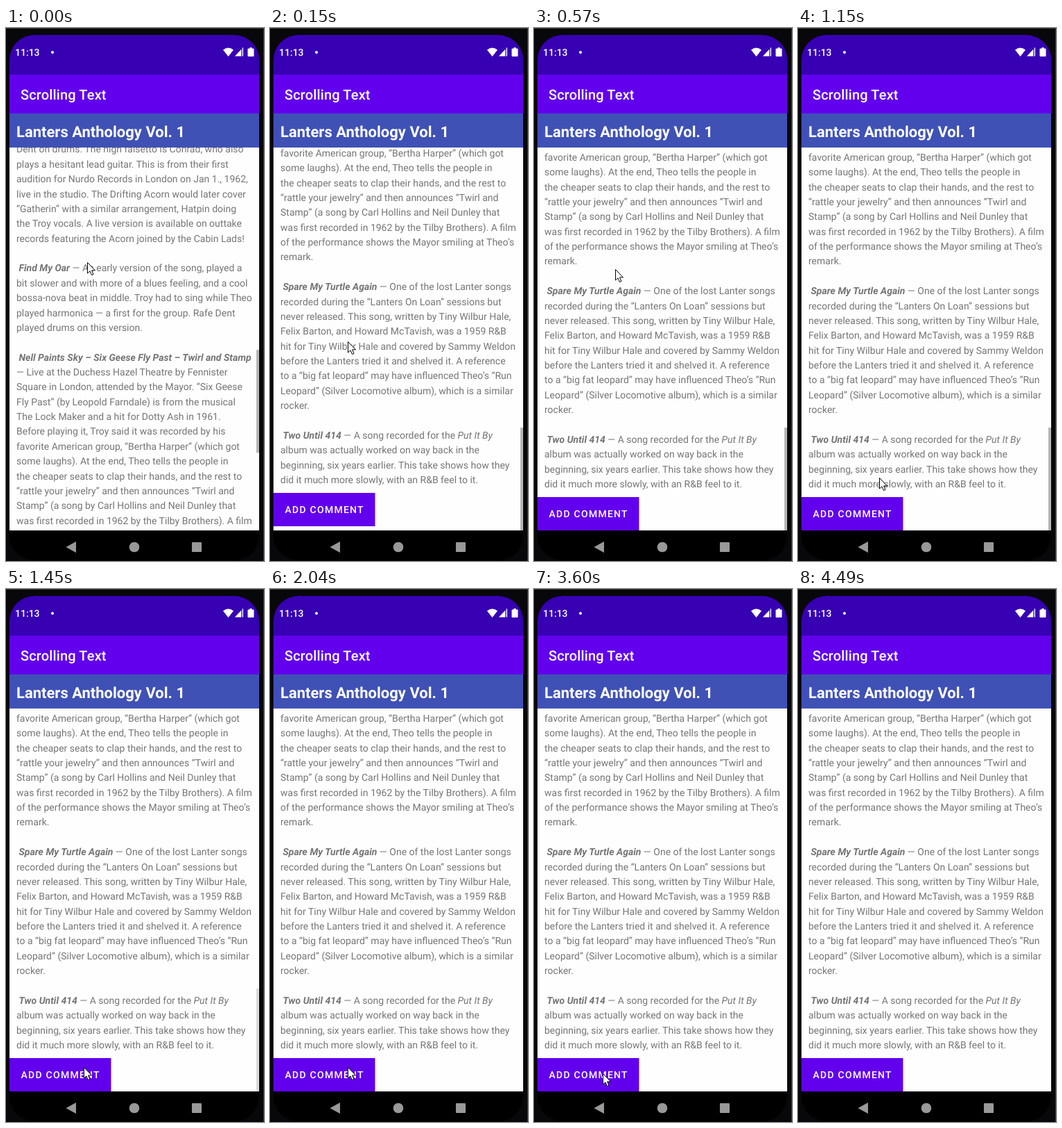
An HTML page for the animation above (5330 ms loop, 372x767 px).

```html
<!DOCTYPE html>
<html lang="en">
<head>
<meta charset="utf-8">
<title>Scrolling Text</title>
<style>
  html, body { margin: 0; width: 100%; height: 100%; overflow: hidden; background: #000; }
  svg { display: block; width: 100%; height: 100%; }
  text {
    font-family: Roboto, "Liberation Sans", sans-serif;
    fill: #fff; white-space: pre; text-rendering: geometricPrecision;
  }
  .body text { font-size: 14px; fill: #757575; }
  .song { font-weight: 700; font-style: italic; }
  .work { font-style: italic; }
  .medium { font-weight: 500; }
</style>
</head>
<body>
<svg viewBox="0 0 372 767">
  <defs>
    <clipPath id="screen"><rect x="5" y="10" width="360" height="756" rx="36"/></clipPath>
    <clipPath id="view"><rect x="5" y="172" width="360" height="551"/></clipPath>
  </defs>
  <rect width="372" height="767" fill="#08080a"/>
  <path d="M0 .5H371.500V767" fill="none" stroke="#3a3a3c"/>

  <g clip-path="url(#screen)">
    <rect width="372" height="767" fill="#000"/>
    <rect width="372" height="67" fill="#3700b3"/>
    <rect y="67" width="372" height="56" fill="#6200ee"/>
    <rect y="123" width="372" height="49" fill="#3f51b5"/>
    <rect y="172" width="372" height="551" fill="#fefefe"/>
  </g>

  <text class="medium" x="13" y="40" font-size="14">11:13</text>
  <circle cx="67" cy="35" r="2" fill="#fff"/>
  <g fill="#fff">
    <path d="M313 31.5Q320.5 25.5 328 31.5L320.5 41Z"/>
    <path d="M342 28V40.5H330Z" opacity=".35"/>
    <path d="M339 31V40.5H330Z"/>
    <path d="M341 28.5L342 28V40.5H341Z"/>
    <path d="M351.5 28h3v1.5h2q1 0 1 1v9.500q0 1-1 1h-7q-1 0-1-1v-9.500q0-1 1-1h2z"/>
  </g>
  <text class="medium" x="21" y="103" font-size="20" letter-spacing=".15">Scrolling Text</text>
  <text x="15" y="157" font-size="22" font-weight="700">Lanters Anthology Vol. 1</text>

  <g clip-path="url(#view)">
    <g id="content">
      <g class="body" id="lines"></g>
      <rect x="5" y="675" width="146.500" height="48" fill="#6200ee"/>
      <text class="medium" x="21.500" y="704" font-size="14" letter-spacing="1.25">ADD COMMENT</text>
    </g>
    <circle id="glow" cx="185" cy="374" r="432" fill="#6200ee"/>
    <rect id="bar" x="361" width="4" height="148" fill="#b4b4b4"/>
  </g>

  <g fill="#999">
    <path d="M86.500 747L101 739V755Z"/>
    <circle cx="185" cy="747" r="7.300"/>
    <rect x="268" y="740" width="14" height="14" rx="1"/>
  </g>
  <path id="cursor" d="M.5.500V16L4 12.800L6.500 18.500L9 17.400L6.600 11.900H11.500Z" fill="#fff" stroke="#000" stroke-linejoin="round"/>
</svg>
<script>
const $ = id => document.getElementById(id);
const LOOP = 5330, LINE = 21.37, BOTTOM = 723, VIEW = 551, BAR = 148;

// *song title*, _work title_
const story = `Dent on drums. The high falsetto is Conrad, who also
plays a hesitant lead guitar. This is from their first
audition for Nurdo Records in London on Jan 1., 1962,
live in the studio. The Drifting Acorn would later cover
“Gatherin” with a similar arrangement, Hatpin doing
the Troy vocals. A live version is available on outtake
records featuring the Acorn joined by the Cabin Lads!

 *Find My Oar* — An early version of the song, played a
bit slower and with more of a blues feeling, and a cool
bossa-nova beat in middle. Troy had to sing while Theo
played harmonica — a first for the group. Rafe Dent
played drums on this version.

 *Nell Paints Sky – Six Geese Fly Past – Twirl and Stamp*
— Live at the Duchess Hazel Theatre by Fennister
Square in London, attended by the Mayor. “Six Geese
Fly Past” (by Leopold Farndale) is from the musical
The Lock Maker and a hit for Dotty Ash in 1961.
Before playing it, Troy said it was recorded by his
favorite American group, “Bertha Harper” (which got
some laughs). At the end, Theo tells the people in
the cheaper seats to clap their hands, and the rest to
“rattle your jewelry” and then announces “Twirl and
Stamp” (a song by Carl Hollins and Neil Dunley that
was first recorded in 1962 by the Tilby Brothers). A film
of the performance shows the Mayor smiling at Theo’s
remark.

 *Spare My Turtle Again* — One of the lost Lanter songs
recorded during the “Lanters On Loan” sessions but
never released. This song, written by Tiny Wilbur Hale,
Felix Barton, and Howard McTavish, was a 1959 R&amp;B
hit for Tiny Wilbur Hale and covered by Sammy Weldon
before the Lanters tried it and shelved it. A reference
to a “big fat leopard” may have influenced Theo’s “Run
Leopard” (Silver Locomotive album), which is a similar
rocker.

 *Two Until 414* — A song recorded for the _Put It By_
album was actually worked on way back in the
beginning, six years earlier. This take shows how they
did it much more slowly, with an R&amp;B feel to it.`;

const rows = story.split('\n');
$('lines').innerHTML = rows.map((line, i) => {
  const html = line
    .replace(/\*(.+?)\*/g, '<tspan class="song">$1</tspan>')
    .replace(/_(.+?)_/g, '<tspan class="work">$1</tspan>');
  const y = 661 - (rows.length - 1 - i) * LINE;
  return `<text x="15" y="${y.toFixed(2)}">${html}</text>`;
}).join('');

// The screen refreshes every 150 ms, so moves go in steps.
const stepped = (t, from) => Math.floor((t - from) / 150);
const clamp = v => Math.min(1, Math.max(0, v));

function pointer(t) {
  if (t < 150) return [117, 337];
  if (t < 450) return [112, 451];
  if (t < 1450) {
    // Down from the text to the button: a quick start, then settling.
    const p = clamp((stepped(t, 700)) / 4);
    const fall = p ** 1.7 / (p ** 1.7 + 0.8 * (1 - p) ** 1.7);
    return [t < 1300 ? 117 : 112, 347 + 337 * fall];
  }
  if (t < 2900) return [112, 688];
  if (t < 4340) return t < 3050 ? [102, 693] : [99, 697];
  return t < 4490 ? [228, 744] : [-50, -50];
}

function set(id, attrs) {
  for (const k in attrs) $(id).setAttribute(k, attrs[k]);
}

function draw(t) {
  const [x, y] = pointer(t);
  const scroll = t < 150 ? 416 : t < 300 ? -6 : 0;
  const glow = t < 300 || t >= 570 ? 0 : t < 450 ? 1 : .5;
  set('cursor', { transform: `translate(${x} ${Math.round(y)})` });
  set('content', { transform: `translate(0 ${scroll})` });
  set('bar', {
    y: BOTTOM - BAR - Math.max(0, scroll) * BAR / VIEW,
    opacity: clamp(1 - stepped(t, 1300) / 2),
  });
  set('glow', { transform: `translate(0 ${BOTTOM}) scale(1 ${glow})`, opacity: .15 * glow });
}

const start = performance.now();
function tick() {
  draw((performance.now() - start) % LOOP);
  requestAnimationFrame(tick);
}
tick();
</script>
</body>
</html>
```
